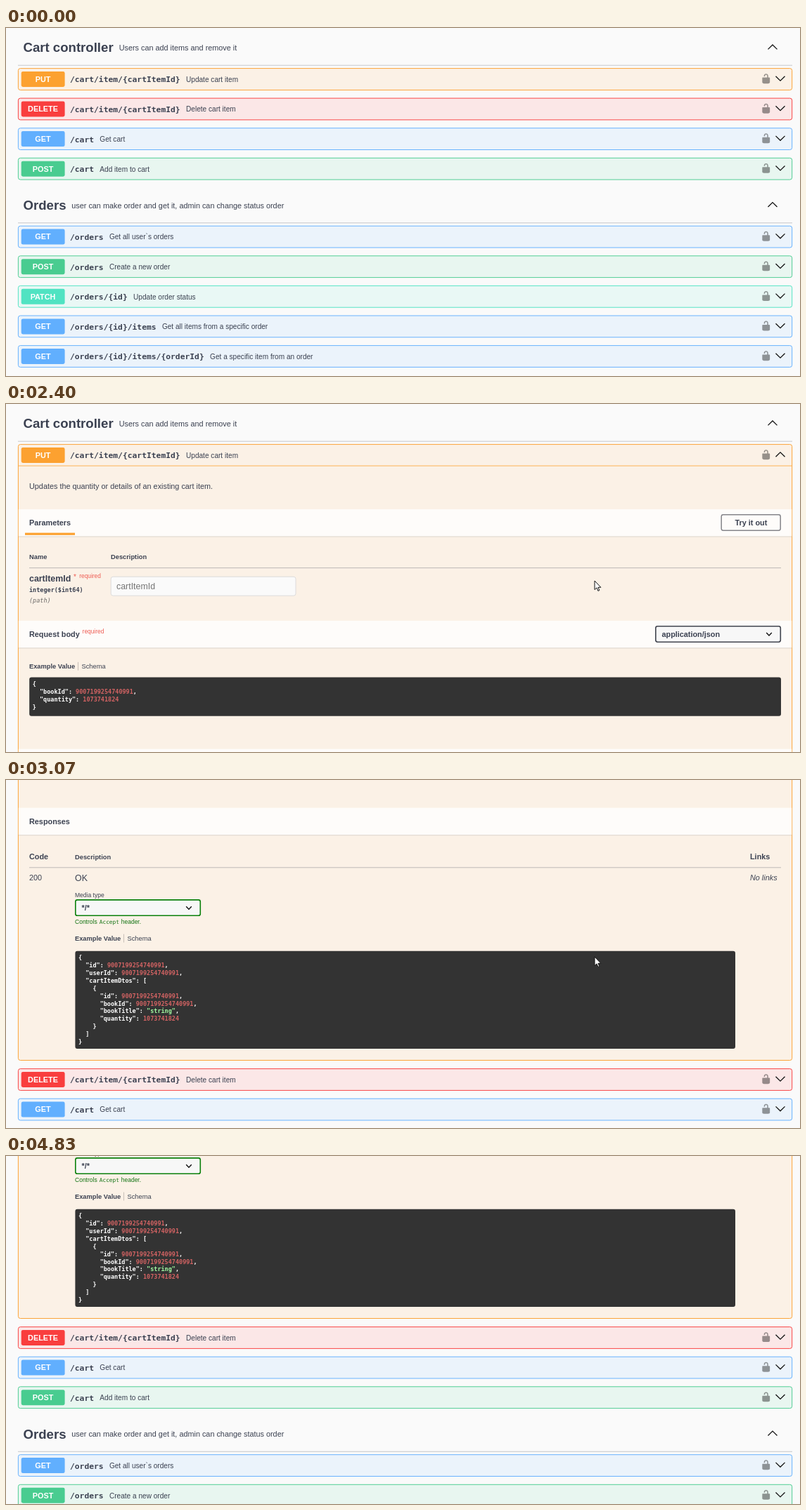
An HTML page for the animation above (5360 ms loop, 1129 px wide and 496 px high).

```html
<!DOCTYPE html>
<html lang="en">
<head>
<meta charset="utf-8">
<title>Cart API</title>
<style>
html, body { margin: 0; width: 100%; height: 100%; overflow: hidden; background: #fafafa; }
svg { display: block; width: 100%; height: 100%; }
text { font-family: "Liberation Sans", Arial, sans-serif; fill: #3b4151; white-space: pre; }
.b { font-weight: 700; }
.i { font-style: italic; }
.m { font-family: "DejaVu Sans Mono", monospace; }
.mid { text-anchor: middle; }
</style>
</head>
<body>
<svg id="stage" viewBox="0 0 1129 496"></svg>
<script>
const LOOP = 5360;
const EXPAND_AT = 1540;
const EXPANDED_SHIFT = 763.5;
const ROW_H = 30.8;
const COLORS = { PUT: '#fca130', DELETE: '#f93e3e', GET: '#61affe', POST: '#49cc90', PATCH: '#50e3c2' };
const LOCK = 'M15.8 8H14V5.6C14 2.703 12.665 1 10 1 7.334 1 6 2.703 6 5.6V6h2v-.8C8 3.754 8.797 3 10 3s2 .754 2 2.2V8H4c-.553 0-1 .646-1 1.2V17c0 .55.428 1.14.95 1.307l1.2.387C5.67 18.86 6.55 19 7.1 19h5.8c.55 0 1.43-.14 1.95-.307l1.2-.387c.52-.167.95-.757.95-1.306V9.2C17 8.646 16.352 8 15.8 8z';
const ARROW = 'M0 0V12.6L2.9 9.9 4.9 14.4 6.8 13.6 4.9 9.3H8.8Z';
const HAND = 'M-1.4 9.5V1.2C-1.4-1 1.4-1 1.4 1.2V7c.8-1 2.6-.6 2.8.6.8-.8 2.3-.4 2.6.7 1-.5 2 .2 2 1.4v3.5c0 2-1.3 3-1.3 5.2H-.2C-.5 15.5-3.5 12.5-4.6 10.6c-.6-1.4 1-2.2 2-1.2z';

const stage = document.getElementById('stage');

function el(parent, tag, attrs = {}, content) {
  const node = document.createElementNS('http://www.w3.org/2000/svg', tag);
  for (const key in attrs) node.setAttribute(key, attrs[key]);
  if (content !== undefined) node.textContent = content;
  return parent.appendChild(node);
}
const text = (g, x, y, size, str, cls = '', fill) =>
  el(g, 'text', { x, y, 'font-size': size, class: cls, ...(fill && { style: 'fill:' + fill }) }, str);
const rect = (g, x, y, x2, y2, attrs) =>
  el(g, 'rect', { x, y, width: x2 - x, height: y2 - y, ...attrs });
const line = (g, x, y, x2, y2, stroke, width = 0.8) =>
  el(g, 'path', { d: `M${x} ${y}L${x2} ${y2}`, stroke, 'stroke-width': width });
const chevronPath = (x, y, w, h) => `M${x - w} ${y - h}L${x} ${y + h}L${x + w} ${y - h}`;
const chevron = (g, x, y, w, h, width = 1.3) =>
  el(g, 'path', { d: chevronPath(x, y, w, h), fill: 'none', stroke: '#111', 'stroke-width': width });

function band(g, y, title) {
  rect(g, 17.8, y, 1117.3, y + 38.6, { fill: '#fff', 'fill-opacity': 0.8 });
  line(g, 17.8, y + 39, 1117.3, y + 39, 'rgba(0,0,0,.13)', 1);
  text(g, 33, y + 22.9, 10.85, title, 'b');
}

function select(g, x, y, label, stroke) {
  rect(g, x, y, x + 177.5, y + 22.4, { rx: 2.6, fill: '#f7f7f7', stroke, 'stroke-width': 1.6 });
  text(g, x + 8.7, y + 15.2, 10.85, label, 'b');
  chevron(g, x + 161.2, y + 11.3, 3.8, 2, 1.4);
}

function exampleTabs(g, x, y) {
  text(g, x, y, 9.3, 'Example Value', 'b');
  line(g, x + 69.5, y - 9, x + 69.5, y + 3, 'rgba(0,0,0,.25)');
  text(g, x + 74.5, y, 9.3, 'Schema');
}

function codeBox(g, x, y, x2, y2, lines) {
  rect(g, x, y, x2, y2, { rx: 3, fill: '#333' });
  lines.forEach((str, i) => {
    const row = text(g, x + 4.6, y + 12.5 + i * 10.88, 8.49, '', 'b m', '#fff');
    for (const part of str.split(/("string"|\d{6,})/)) {
      const fill = part === '"string"' ? '#a2fca2' : /^\d/.test(part) ? '#d36363' : '#fff';
      el(row, 'tspan', { fill }, part);
    }
  });
}

function section(g, y, title, descX, desc) {
  text(g, 24.5, y + 34.4, 18.6, title, 'b');
  text(g, descX, y + 31.9, 10.85, desc);
  el(g, 'path', { d: chevronPath(1090, y + 27.2, 6.5, -3.2), fill: 'none', stroke: '#111', 'stroke-width': 1.3 });
  line(g, 17, y + 53.2, 1118, y + 53.2, 'rgba(59,65,81,.35)');
}

const rows = [];
function operation(g, method, top, path, desc) {
  const color = COLORS[method], mid = top + ROW_H / 2;
  const box = rect(g, 17.4, top, 1117.7, top + ROW_H,
    { rx: 3, fill: color, 'fill-opacity': 0.1, stroke: color, 'stroke-width': 0.95 });
  rect(g, 21.7, mid - 11, 83.6, mid + 11, { rx: 2.4, fill: color });
  text(g, 52.5, mid + 3.8, 10.85, method, 'b mid', '#fff');
  text(g, 91, mid + 4.4, 11.32, path, 'b m');
  text(g, 99.2 + path.length * 6.817, mid + 3.8, 10.1, desc);
  el(g, 'path', { d: LOCK, opacity: 0.4, transform: `translate(1073 ${top + 6.8}) scale(.775)` });
  const arrow = chevron(g, 1101, top + 14.4, 6.5, 3.2);
  const copy = el(g, 'g', { transform: `translate(1043 ${top + 5.6})`, visibility: 'hidden' });
  rect(copy, 0, 0, 18.5, 19.6, { rx: 3, fill: '#7d8492' });
  el(copy, 'path', {
    d: 'M7 5.2H5V14.5H13.8V12.2M11.5 5.2H13.8V7.4M7.2 4.2H11.4V6.3H7.2ZM14.5 9.8H8.5M10.6 7.8L8.5 9.8L10.6 11.8M6.6 8.4H8M6.6 11.6H8',
    fill: 'none', stroke: '#fff', 'stroke-width': 1
  });
  const row = { top, box, arrow, copy, moves: g === below };
  rows.push(row);
  return row;
}

const page = el(stage, 'g');
const details = el(page, 'g');
const below = el(page, 'g');

section(page, 0, 'Cart controller', 160.7, 'Users can add items and remove it');
const put = operation(page, 'PUT', 57.6, '/cart/item/{cartItemId}', 'Update cart item');

[['DELETE', '/cart/item/{cartItemId}', 'Delete cart item'],
 ['GET', '/cart', 'Get cart'],
 ['POST', '/cart', 'Add item to cart']]
  .forEach(([method, path, desc], i) => operation(below, method, 100.1 + 42.6 * i, path, desc));
section(below, 224.6, 'Orders', 93.3, 'user can make order and get it, admin can change status order');
[['GET', '/orders', 'Get all user`s orders'],
 ['POST', '/orders', 'Create a new order'],
 ['PATCH', '/orders/{id}', 'Update order status'],
 ['GET', '/orders/{id}/items', 'Get all items from a specific order'],
 ['GET', '/orders/{id}/items/{orderId}', 'Get a specific item from an order']]
  .forEach(([method, path, desc], i) => operation(below, method, 282.2 + 42.6 * i, path, desc));

function buildDetails(g) {
  const red = '#ee5b52', rule = 'rgba(59,65,81,.4)', green = '#137313';
  line(g, 17.4, 88.1, 1117.7, 88.1, COLORS.PUT);
  text(g, 33, 120.8, 10.85, 'Updates the quantity or details of an existing cart item.');

  band(g, 150, 'Parameters');
  rect(g, 27, 183.6, 98, 186.8, { fill: COLORS.PUT });
  rect(g, 1017.2, 157.8, 1101.2, 180.2, { rx: 2.6, fill: 'none', stroke: '#85858a', 'stroke-width': 1.5 });
  text(g, 1059.4, 172.9, 10.85, 'Try it out', 'b mid');
  text(g, 33, 221.4, 9.3, 'Name', 'b');
  text(g, 149, 221.4, 9.3, 'Description', 'b');
  line(g, 33, 233.6, 1102, 233.6, rule);
  text(g, 33, 252.6, 12.4, 'cartItemId', 'b');
  text(g, 96, 250, 10, '*', '', red);
  text(g, 104.2, 248, 8.4, 'required', '', red);
  text(g, 33, 268.2, 8.49, 'integer($int64)', 'b m');
  text(g, 33, 283, 8.49, '(path)', 'i m', '#6d6a68');
  rect(g, 149.2, 246.2, 412, 273.2, { rx: 3, fill: '#fafafa', stroke: '#d9d9d9', 'stroke-width': 0.9 });
  text(g, 157, 263.6, 12.4, 'cartItemId', '', '#757575');

  band(g, 308.9, 'Request body');
  text(g, 108.6, 327.3, 8.4, 'required', '', red);
  select(g, 923.8, 316.8, 'application/json', '#41444e');
  exampleTabs(g, 33, 376.8);
  codeBox(g, 33.2, 389.5, 1102, 444.8,
    ['{', '  "bookId": 9007199254740991,', '  "quantity": 1073741824', '}']);

  band(g, 491.7, 'Responses');
  text(g, 33, 565, 10.85, 'Code', 'b');
  text(g, 98, 564.5, 9.3, 'Description', 'b');
  text(g, 1058, 565, 10.85, 'Links', 'b');
  line(g, 33, 576.8, 1102, 576.8, rule);
  text(g, 33, 595.2, 10.85, '200');
  text(g, 98, 595.8, 12.4, 'OK');
  text(g, 1058, 595.2, 10.85, 'No links', 'i');
  text(g, 98, 619.3, 8.525, 'Media type');
  select(g, 98.8, 622.9, '*/*', '#0b800b');
  text(g, 98, 656.5, 8.525, 'Controls', '', green);
  text(g, 132.8, 656.5, 7.79, 'Accept', 'm', green);
  text(g, 163.7, 656.5, 8.525, 'header.', '', green);
  exampleTabs(g, 98, 680.6);
  codeBox(g, 98.4, 695.8, 1037, 835, [
    '{', '  "id": 9007199254740991,', '  "userId": 9007199254740991,', '  "cartItemDtos": [', '    {',
    '      "id": 9007199254740991,', '      "bookId": 9007199254740991,', '      "bookTitle": "string",',
    '      "quantity": 1073741824', '    }', '  ]', '}']);
}
buildDetails(details);
page.insertBefore(put.box, details);

const cursor = el(stage, 'path', { fill: '#fff', stroke: '#111', 'stroke-width': 1, 'stroke-linejoin': 'round' });

// Pointer moves: start, end, number of steps, way points
const MOVES = [
  [130, 530, 7, [[1122, 462], [1119, 330], [1121, 180], [1140, 150]]],
  [820, 1340, 9, [[1126, 73], [1113, 74], [1105, 72.5]]],
  [1930, 2400, 8, [[1098, 80], [1000, 150], [880, 225], [837, 252]]],
  [4000, 4490, 8, [[845, 249], [905, 232], [925, 290], [920, 430]]],
  [4560, 4830, 5, [[918, 448], [914, 475], [912, 520]]]
];
// Scroll steps: time, offset
const SCROLL = [
  [0, 0], [2470, 12], [2540, 50], [2610, 102.3], [2670, 157], [2740, 218], [2810, 278], [2870, 333.2],
  [2940, 384], [3010, 425], [3070, 452], [3140, 465],
  [3340, 479], [3410, 507.3], [3470, 546], [3540, 585], [3600, 610], [3670, 620]
];

const lastBefore = (table, t) => table.filter(entry => entry[0] <= t).pop();

function pointerAt(t) {
  const move = lastBefore(MOVES, t);
  if (!move) return [1200, 600];
  const [start, end, steps, points] = move;
  const step = Math.min(steps - 1, Math.floor((t - start) / (end - start) * (steps - 1) + 0.08));
  const pos = step / (steps - 1) * (points.length - 1);
  const i = Math.min(points.length - 2, Math.floor(pos));
  return points[i].map((v, axis) => v + (points[i + 1][axis] - v) * (pos - i));
}

function render(t) {
  const open = t >= EXPAND_AT;
  const scroll = lastBefore(SCROLL, t)[1];
  const [x, y] = pointerAt(t);
  const scrolling = t >= SCROLL[1][0] && t < MOVES[3][0];

  page.setAttribute('transform', `translate(0 ${-scroll})`);
  below.setAttribute('transform', `translate(0 ${open ? EXPANDED_SHIFT : 0})`);
  details.setAttribute('visibility', open ? 'visible' : 'hidden');
  put.box.setAttribute('height', open ? 793.9 : ROW_H);
  put.arrow.setAttribute('d', chevronPath(1101, put.top + 14.4, 6.5, open ? -3.2 : 3.2));

  let hovering = false;
  for (const row of rows) {
    const top = row.top - scroll + (open && row.moves ? EXPANDED_SHIFT : 0);
    const over = !scrolling && x > 17 && x < 1118 && y > top && y < top + ROW_H;
    row.copy.setAttribute('visibility', over ? 'visible' : 'hidden');
    hovering = hovering || over;
  }
  cursor.setAttribute('d', hovering ? HAND : ARROW);
  cursor.setAttribute('transform', `translate(${x} ${y})`);
}

const begin = performance.now();
function tick() {
  render((performance.now() - begin) % LOOP);
  requestAnimationFrame(tick);
}
tick();
</script>
</body>
</html>
```
